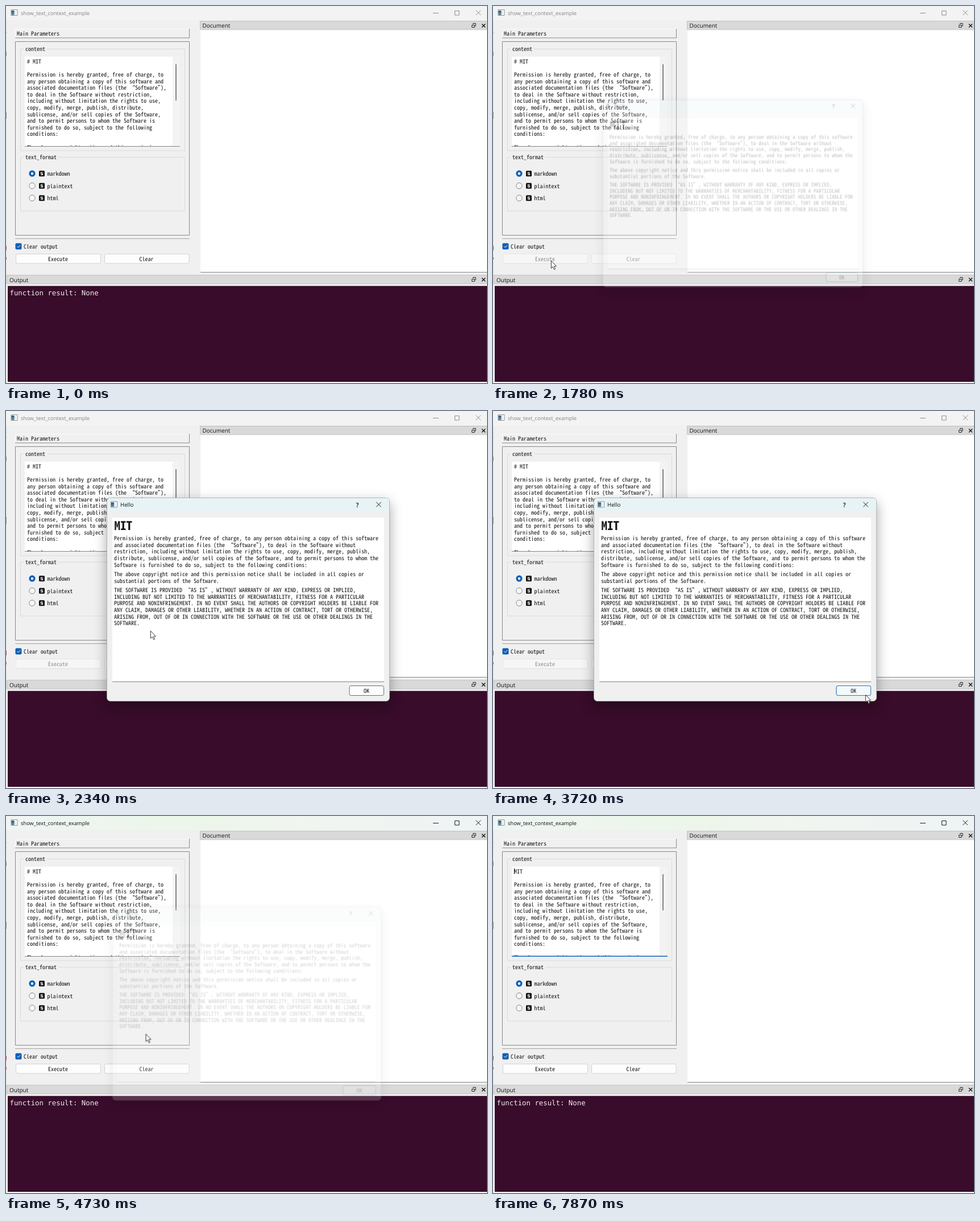
These frames come from a looping animation (846 by 662 pixels, 8 s). An HTML page:

```html
<!DOCTYPE html>
<html lang="en">
<head>
<meta charset="utf-8">
<title>Text dialog demo</title>
<style>
html, body { margin: 0; width: 100%; height: 100%; overflow: hidden; background: #f0f0f0; }
svg { display: block; width: 846px; height: 662px; }
text { white-space: pre; text-rendering: geometricPrecision; fill: #111; }
.mono { font: 10px "Noto Sans Mono CJK SC", "Noto Sans Mono CJK JP", "Liberation Mono", monospace; font-size-adjust: ch-width .5; }
.head { font-size: 21px; font-weight: 700; }
.ui { font: 10px "Open Sans", "Noto Sans", sans-serif; }
.caption { font-size: 9.3px; }
.console { font: 12.35px "DejaVu Sans Mono", monospace; fill: #eee; }
.mid { text-anchor: middle; }
.line { fill: none; stroke: #dadada; }
.box { fill: #fdfdfd; stroke: #d2d2d2; }
.white { fill: #fff; }

/* Every state shares one 8 s clock */
.state { animation: 8s step-end infinite; }
.active { animation-name: active; }
.hover { animation-name: hover; }
.busy { animation-name: busy; }
.idle { animation-name: idle; }
.okHover { animation-name: okHover; }
.focus { animation-name: focus; }
.full { animation-name: full; }
.cut1 { animation-name: cut1; }
.cut2 { animation-name: cut2; }
.caret { animation-name: caret; }
.arrow { animation-name: arrow; }
.beam { animation-name: beam; }
.dialog { transform-origin: 426px 331px; animation: dialog 8s linear infinite; }
.pointer { animation: pointer 8s linear infinite; }
.shadow { filter: drop-shadow(0 8px 11px rgba(0, 0, 0, .34)); }

@keyframes active { 0%, 22.25% { opacity: 0 } 19.625%, 56.625%, 100% { opacity: 1 } }
@keyframes hover { 0%, 22.25%, 100% { opacity: 0 } 10.125% { opacity: 1 } }
@keyframes busy { 0%, 56.625%, 100% { opacity: 0 } 22.25% { opacity: 1 } }
@keyframes idle { 0%, 56.625%, 100% { opacity: 1 } 22.25% { opacity: 0 } }
@keyframes okHover { 0%, 55.75%, 100% { opacity: 0 } 46.5% { opacity: 1 } }
@keyframes focus { 0% { opacity: 0 } 70.625%, 100% { opacity: 1 } }
@keyframes full { 0% { opacity: 1 } 83.875%, 100% { opacity: 0 } }
@keyframes cut1 { 0%, 85.5%, 100% { opacity: 0 } 83.875% { opacity: 1 } }
@keyframes cut2 { 0% { opacity: 0 } 85.5%, 100% { opacity: 1 } }
@keyframes caret {
  0% { opacity: 0; transform: translateX(10px) }
  70.625% { opacity: 1; transform: translateX(10px) }
  77.25% { opacity: 0; transform: translateX(10px) }
  83.875% { opacity: 1; transform: translateX(5px) }
  85.5% { opacity: 1; transform: none }
  90.75% { opacity: 0; transform: none }
  97.375%, 100% { opacity: 1; transform: none }
}
@keyframes arrow {
  0%, 61.75%, 68.5%, 100% { opacity: 0 }
  1.5%, 66.25% { opacity: 1 }
}
@keyframes beam {
  0%, 66.25%, 98.375%, 100% { opacity: 0 }
  61.75%, 68.5% { opacity: 1 }
}
@keyframes dialog {
  0%, 22.24% { opacity: 0; transform: translate(-4px, -2px) scale(.92) }
  22.25% { opacity: .25; transform: translate(-4px, -2px) scale(.92) }
  23.125% { opacity: .75; transform: translate(-3px, -1.5px) scale(.946) }
  24% { opacity: 1; transform: translate(-2px, -1px) scale(.9656) }
  24.875% { opacity: 1; transform: translate(-1px, -.5px) scale(.988) }
  25.75%, 56.625% { opacity: 1; transform: translate(0, 0) scale(1) }
  57.5% { opacity: .82; transform: translate(-1px, -.5px) scale(.982) }
  58.25% { opacity: .5; transform: translate(-2px, -1px) scale(.966) }
  59.125% { opacity: .19; transform: translate(-2.5px, -1.5px) scale(.951) }
  60%, 100% { opacity: 0; transform: translate(-4px, -2px) scale(.94) }
}
@keyframes pointer {
  0%, 1.5% { transform: translate(632px, 619px) }
  4% { transform: translate(430px, 500px) }
  6.5% { transform: translate(225px, 415px) }
  8% { transform: translate(160px, 409px) }
  11%, 16.2% { transform: translate(100px, 440px) }
  21.4%, 25% { transform: translate(102px, 447px) }
  28.5% { transform: translate(230px, 395px) }
  31.875% { transform: translate(336px, 354px) }
  33.625%, 36% { transform: translate(339px, 347px) }
  37.75% { transform: translate(300px, 331px) }
  39.5% { transform: translate(460px, 400px) }
  42.125%, 43% { transform: translate(693px, 520px) }
  46.5% { transform: translate(655px, 498px) }
  50% { transform: translate(642px, 492px) }
  53.25%, 54.875% { transform: translate(638px, 490px) }
  57% { transform: translate(460px, 440px) }
  59.125% { transform: translate(246px, 383px) }
  61.75% { transform: translate(165px, 246px) }
  65.375% { transform: translate(95px, 105px) }
  67.125% { transform: translate(66px, 45px) }
  69.75%, 72.5% { transform: translate(52px, 105px) }
  73.125%, 95.5% { transform: translate(49px, 104px) }
  97.5%, 100% { transform: translate(62px, 91px) }
}
</style>
</head>
<body>
<svg viewBox="0 0 846 662">
  <defs>
    <linearGradient id="bar">
      <stop offset="0" stop-color="#eff5f4"/>
      <stop offset=".35" stop-color="#ecf6e9"/>
      <stop offset=".65" stop-color="#f0f5f0"/>
      <stop offset="1" stop-color="#eef3f5"/>
    </linearGradient>
    <linearGradient id="pane" x2="0" y2="1">
      <stop offset="0" stop-color="#2d4f7c"/>
      <stop offset="1" stop-color="#6e9a9a"/>
    </linearGradient>
    <g id="app">
      <path d="M.5.5h11v10H.5z" fill="#fafafa" stroke="#8b9299"/>
      <path d="M1 2h5v8H1z" fill="url(#pane)"/>
      <path d="M7.5 3v6" stroke="#c5cace"/>
    </g>
    <path id="controls" d="M751 12.5h10M789.5 8.5h7.500v7.500h-7.500zM826.500 7.500l8.500 8.500m0-8.500l-8.500 8.500" fill="none"/>
    <g id="dock" fill="none" stroke="#222">
      <path d="M821.500 32v-1.500h4.500v4.500h-1.500M819.500 33.500h4.500v4h-4.500z"/>
      <path d="M837 31.500l6 6m0-6l-6 6" stroke-width="1.600"/>
    </g>
    <g id="option">
      <rect x="58" y="-5" width="10" height="10" rx="1.500" fill="#111"/>
      <path d="M64.800-2h-3.300v2h3v2.200h-3.500" fill="none" stroke="#fff" stroke-width="1.100"/>
    </g>
    <clipPath id="editor"><path d="M33 89h260v157H33z"/></clipPath>
  </defs>

  <path d="M0 0h846v662H0z" fill="#f0f0f0"/>
  <path d="M0 0h846v25H0z" fill="#f3f3f3"/>
  <use href="#controls" stroke="#8c8c8c"/>
  <text class="ui caption" x="26" y="15.700" style="fill:#858585">show_text_context_example</text>
  <g class="state active">
    <path d="M0 0h846v25H0z" fill="url(#bar)"/>
    <use href="#controls" stroke="#1a1a1a"/>
    <text class="ui caption" x="26" y="15.700">show_text_context_example</text>
  </g>
  <use href="#app" x="8.500" y="6"/>
  <path d="M.5 26v634" stroke="#e2e2e2"/>
  <path d="M.5 46v1M.5 80v8M.5 186v12" stroke="#8c8c94"/>
  <path d="M.5 421v8M.5 441v4" stroke="#a4525c"/>

  <!-- Document dock -->
  <path d="M341.500 26.500H846v14.500H341.500z" fill="#d9d9d9" stroke="#c2c2c2"/>
  <text class="ui" x="345.500" y="38.200">Document</text>
  <use href="#dock"/>
  <path class="white" d="M342 43h504v424H342z"/>
  <path d="M342 467.500h504" stroke="#858585"/>

  <!-- Output dock -->
  <path d="M1.500 472.500H846v15.500H1.500z" fill="#d9d9d9" stroke="#c6c6c6"/>
  <text class="ui" x="6" y="484.700">Output</text>
  <use href="#dock" y="446"/>
  <path class="white" d="M2 490h844v171H2z"/>
  <path d="M3 491.500h843V660H3z" fill="#380c2a"/>
  <text class="console state idle" x="6.500" y="508">function result: None</text>

  <!-- Parameters -->
  <path d="M16.500 56V40.500H322" fill="none" stroke="#fafafa"/>
  <path d="M16 56h306.500V40" fill="none" stroke="#8a8a8a"/>
  <text class="mono" x="19" y="51.700">Main Parameters</text>
  <path class="line" d="M16.500 62.500h306v340h-306z" style="stroke:#84898f"/>
  <path class="line" d="M31 75.500h-5.500v178.500h289V75.500H72"/>
  <text class="mono" x="34" y="78.500">content</text>
  <path class="white" d="M33 89h260v158H33z"/>
  <path d="M293 89h13v158h-13z" fill="#f3f3f3"/>
  <path d="M299 103v62" stroke="#858585" stroke-width="2" stroke-linecap="round"/>
  <g class="mono" clip-path="url(#editor)">
    <text class="state full" x="37" y="100.700"># MIT</text>
    <text class="state cut1" x="37" y="100.700">#MIT</text>
    <text class="state cut2" x="37" y="100.700">MIT</text>
    <g id="licence"></g>
    <path class="state caret" d="M37.500 92v10" stroke="#000"/>
  </g>
  <path d="M33 246.500h273" stroke="#858585"/>
  <path class="state focus" d="M33 246.300h274" stroke="#0f62b5" stroke-width="1.600"/>

  <path class="line" d="M31 265.500h-5.500v94.500h289v-94.500H92"/>
  <text class="mono" x="34" y="269.300">text_format</text>
  <g class="mono" id="formats"></g>

  <path d="M16 408.500h307" stroke="#a2a2a2"/>
  <rect x="16.500" y="416.500" width="11" height="11" rx="2" fill="#0f5fb4"/>
  <path d="M19.500 422l2 2 3.500-3.800" fill="none" stroke="#fff"/>
  <text class="mono" x="31" y="426">Clear output</text>

  <rect class="box" x="17.500" y="435.500" width="149" height="16.500" rx="3"/>
  <rect class="box" x="173.500" y="435.500" width="148.500" height="16.500" rx="3"/>
  <rect class="state hover" x="17.500" y="435.500" width="149" height="16.500" rx="3" fill="#eff5fa" stroke="#5c9bd1"/>
  <text class="mono mid" x="91.500" y="447.500">Execute</text>
  <text class="mono mid" x="247" y="447.500">Clear</text>
  <g class="state busy">
    <rect class="box" x="17.500" y="435.500" width="149" height="16.500" rx="3" style="fill:#f6f6f6;stroke:#e6e6e6"/>
    <rect class="box" x="173.500" y="435.500" width="148.500" height="16.500" rx="3" style="fill:#f6f6f6;stroke:#e6e6e6"/>
    <text class="mono mid" x="91.500" y="447.500" style="fill:#8c8c8c">Execute</text>
    <text class="mono mid" x="247" y="447.500" style="fill:#8c8c8c">Clear</text>
  </g>

  <!-- Message dialog -->
  <g class="dialog">
    <rect class="shadow" x="177.500" y="152.500" width="497" height="357" rx="6" fill="#f0f0f0" stroke="#a3aaad" stroke-width=".8"/>
    <path d="M178 178v-19q0-6 6-6h484q6 0 6 6v19z" fill="#e8f3f5"/>
    <use href="#app" x="184" y="158.500"/>
    <text class="ui" x="201" y="168" style="font-size:9.700px">Hello</text>
    <text class="ui mid" x="618" y="168.500" style="font-size:11px;font-weight:600">?</text>
    <path d="M651.300 160l8.400 8.400m0-8.400l-8.400 8.400" stroke="#1a1a1a"/>
    <path class="white" d="M187 187.500h478V475H187z"/>
    <path d="M187 475.500h478" stroke="#858585"/>
    <text class="mono head" x="190.500" y="209">MIT</text>
    <g class="mono" id="message"></g>
    <rect x="604" y="482.500" width="60.500" height="17" rx="3" fill="#fdfdfd" stroke="#4a7698"/>
    <rect class="state okHover" x="604" y="482.500" width="60.500" height="17" rx="3" fill="#f4f9fd" stroke="#2f78bd"/>
    <text class="mono mid" x="634" y="495">OK</text>
  </g>

  <g class="pointer">
    <path class="state arrow" d="M.4.4v13.200l3-2.800 2.200 4.900 2.100-.9-2.200-4.800h4z" fill="#fff" stroke="#222" stroke-width=".9"/>
    <path class="state beam" d="M-3-5.500h2.200L0-5l.8-.5H3M0-5V5M-3 5.500h2.200L0 5l.8.500H3" fill="none" stroke="#111"/>
  </g>
</svg>
<script>
const $ = id => document.getElementById(id);
const text = (x, y, s) => `<text x="${x}" y="${y}">${s}</text>`;
const lines = (x, y, step, s) => s.split('\n').map((l, i) => text(x, y + i * step, l)).join('');

$('licence').innerHTML = lines(37, 124, 11.6, `Permission is hereby granted, free of charge, to
any person obtaining a copy of this software and
associated documentation files (the “Software”),
to deal in the Software without restriction,
including without limitation the rights to use,
copy, modify, merge, publish, distribute,
sublicense, and/or sell copies of the Software,
and to permit persons to whom the Software is
furnished to do so, subject to the following
conditions:

The above copyright notice and this permission`);

$('message').innerHTML = lines(190, 227, 11.65, `Permission is hereby granted, free of charge, to any person obtaining a copy of this software
and associated documentation files (the “Software”), to deal in the Software without
restriction, including without limitation the rights to use, copy, modify, merge, publish,
distribute, sublicense, and/or sell copies of the Software, and to permit persons to whom the
Software is furnished to do so, subject to the following conditions:`)
+ lines(190, 290, 11.65, `The above copyright notice and this permission notice shall be included in all copies or
substantial portions of the Software.`)
+ lines(190, 318, 11.65, `THE SOFTWARE IS PROVIDED “AS IS”, WITHOUT WARRANTY OF ANY KIND, EXPRESS OR IMPLIED,
INCLUDING BUT NOT LIMITED TO THE WARRANTIES OF MERCHANTABILITY, FITNESS FOR A PARTICULAR
PURPOSE AND NONINFRINGEMENT. IN NO EVENT SHALL THE AUTHORS OR COPYRIGHT HOLDERS BE LIABLE FOR
ANY CLAIM, DAMAGES OR OTHER LIABILITY, WHETHER IN AN ACTION OF CONTRACT, TORT OR OTHERWISE,
ARISING FROM, OUT OF OR IN CONNECTION WITH THE SOFTWARE OR THE USE OR OTHER DEALINGS IN THE
SOFTWARE.`);

$('formats').innerHTML = ['markdown', 'plaintext', 'html'].map((name, i) => {
  const y = 294.2 + i * 21.5;
  const dot = i
    ? `<circle cx="46" cy="${y}" r="5.200" fill="#f6f6f6" stroke="#858585"/>`
    : `<circle cx="46" cy="${y}" r="3.900" fill="#fff" stroke="#0f5fb4" stroke-width="3.400"/>`;
  return dot + `<use href="#option" y="${y}"/>` + text(72.5, y + 4, name);
}).join('');
</script>
</body>
</html>
```
